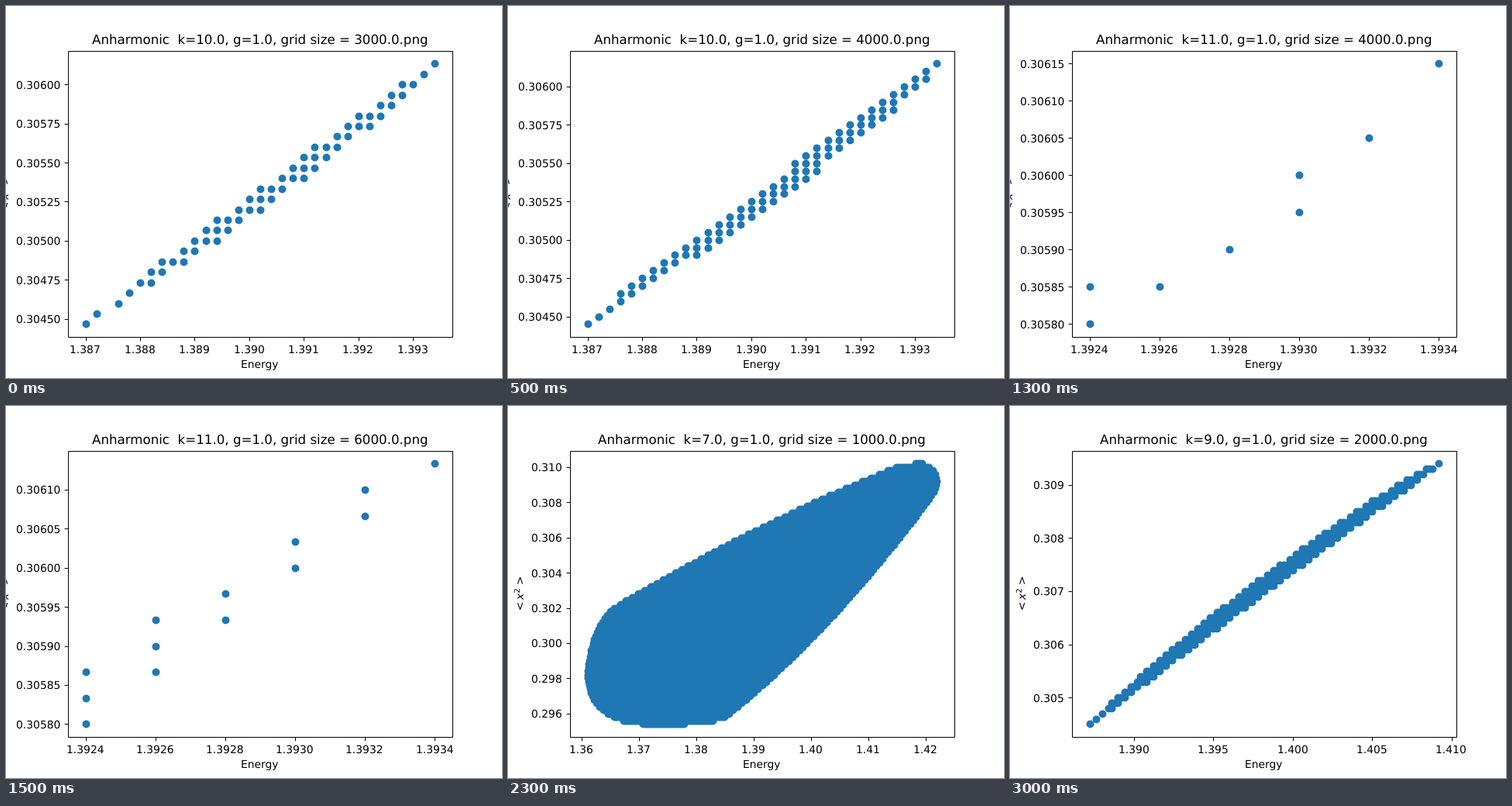
An HTML page for the animation above (3500 ms loop, 640 by 480 pixels).

```html
<!DOCTYPE html>
<html lang="en">
<head>
<meta charset="utf-8">
<title>Anharmonic scatter plots</title>
<style>
  html, body { margin: 0; width: 100%; height: 100%; overflow: hidden; background: #fff; }
  svg { display: block; width: 640px; height: 480px; }
  text { font-family: "DejaVu Sans", sans-serif; fill: #000; white-space: pre; text-rendering: geometricPrecision; }
  .line { fill: none; stroke: #000; stroke-width: 1; }
  .dots { fill: none; stroke: #1f77b4; stroke-width: 10; stroke-linecap: round; }
</style>
</head>
<body>
<svg id="plot" viewBox="0 0 640 480"></svg>
<script>
const HOLD = 500;
const LEFT = 102.55, WIDE = 450.9, TOP = 74.4, BASE = 410.4;
const SMALL = 13.89, LARGE = 16.67;
const { ceil, floor, round, min } = Math;
const svg = document.getElementById('plot');
const pen = document.createElement('canvas').getContext('2d');

const snap = v => floor(v + 0.5) + 0.5;
const dash = (x0, x1, y) => `M${snap(x0)} ${snap(y)}h${round(x1) - round(x0)}`;
const rowY = (j, rows) => BASE - (BASE - TOP) * j / rows;
const colX = (i, cols) => LEFT + WIDE * i / cols;
const bump = u => 4 * u * (1 - u);

// Vertical runs of dots, lo to hi in each column
function columns(cols, rows, lo, hi) {
  let d = '';
  for (let i = 0; i <= cols; i++) {
    const x = colX(i, cols), end = hi(i, i / cols);
    for (let j = lo(i, i / cols); j <= end; j++) d += dash(x, x, rowY(j, rows));
  }
  return d;
}

// Horizontal runs of dots, lo to hi in each row
function beads(cols, rows, lo, hi) {
  let d = '';
  for (let j = 0; j <= rows; j++) {
    const end = hi(j, j / rows);
    for (let i = lo(j, j / rows); i <= end; i++) {
      const x = colX(i, cols);
      d += dash(x, x, rowY(j, rows));
    }
  }
  return d;
}

// x at height y on a downward chain of quadratic curves: point, control, point, ...
function edge(chain, y) {
  let k = 0;
  while (k + 4 < chain.length && chain[k + 2][1] < y) k += 2;
  const [p, c, q] = chain.slice(k, k + 3);
  const at = (t, n) => (1 - t) ** 2 * p[n] + 2 * t * (1 - t) * c[n] + t * t * q[n];
  let a = 0, b = 1;
  for (let n = 0; n < 20; n++) {
    const m = (a + b) / 2;
    if (at(m, 1) < y) a = m; else b = m;
  }
  return at(a, 0);
}

// Dots so dense that each row is one solid run between two edges
function strips(rows, left, right) {
  let d = '';
  for (let j = 0; j <= rows; j++) {
    const y = rowY(j, rows);
    d += dash(edge(left, y), edge(right, y), y);
  }
  return d;
}

// x, y: data range; xt, yt: first tick, last tick, step, decimals
const charts = [
  { k: 10, grid: 3000, x: [1.387, 1.3934], y: [4567 / 15000, 4592 / 15000],
    xt: [1.387, 1.393, 0.001, 3], yt: [0.3045, 0.306, 0.00025, 5],
    d: columns(32, 25,
      (i, u) => ceil(0.78125 * i - 1.3 * bump(u) - 0.7 * u),
      (i, u) => floor(0.78125 * i + 0.32 + 0.33 * bump(u))) },
  { k: 10, grid: 4000, x: [1.387, 1.3934], y: [0.30445, 0.30615],
    xt: [1.387, 1.393, 0.001, 3], yt: [0.3045, 0.306, 0.00025, 5],
    d: columns(32, 34,
      (i, u) => ceil(1.0625 * i - 5.04 * u ** 0.83 * (1 - u) ** 0.4),
      i => floor(1.0625 * i + 0.84)) },
  { k: 11, grid: 4000, x: [1.3924, 1.3934], y: [0.3058, 0.30615],
    xt: [1.3924, 1.3934, 0.0002, 4], yt: [0.3058, 0.30615, 0.00005, 5],
    d: columns(5, 7,
      i => i + floor(i / 4) + floor(i / 5),
      (i, u) => floor(1.4 * i + 1 - 0.5 * bump(u) - u)) },
  { k: 11, grid: 6000, x: [1.3924, 1.3934], y: [0.3058, 9184 / 30000],
    xt: [1.3924, 1.3934, 0.0002, 4], yt: [0.3058, 0.3061, 0.00005, 5],
    d: columns(5, 10, i => 2 * i, i => min(10, 2 * i + (i < 2 ? 2 : 1))) },
  { k: 7, grid: 1000, x: [1.361, 1.422], y: [0.2954, 0.3102],
    xt: [1.36, 1.42, 0.01, 2], yt: [0.296, 0.31, 0.002, 3],
    d: strips(74,
      [[526, TOP], [515, 74.5], [501, 79], [319, 152], [137, 260.5], [108, 285],
        [103, 345], [104, 404], [174, BASE]],
      [[534, TOP], [566, 87], [543, 120], [411, 297], [279, 401.3], [264, 408], [227, BASE]]) },
  { k: 8, grid: 1000, x: [1.3638, 1.4092], y: [0.301, 0.3094],
    xt: [1.37, 1.41, 0.01, 2], yt: [0.302, 0.308, 0.002, 3],
    d: strips(42,
      [[553, TOP], [370, 175], [115, 378], [101, 390], [103, BASE]],
      [[553, TOP], [250, 360], [138, BASE]]) },
  { k: 9, grid: 2000, x: [1.3872, 1.4092], y: [0.3045, 0.3094],
    xt: [1.39, 1.41, 0.005, 3], yt: [0.305, 0.309, 0.001, 3],
    d: beads(110, 49,
      (j, u) => ceil(1.675 * j + 0.0106 * j * j - 0.05 + 2.48 * u ** 60),
      (j, u) => floor(2.245 * j + 0.55 - 0.9 * bump(u))) }
];

function ticks([first, last, step]) {
  const n = round((last - first) / step);
  return Array.from({ length: n + 1 }, (_, i) => first + i * step);
}

function width(s, size) {
  pen.font = `${size}px "DejaVu Sans", sans-serif`;
  return pen.measureText(s).width;
}

const text = (x, y, s, size = SMALL, more = '') =>
  `<text x="${x}" y="${y}" font-size="${size}" ${more}>${s}</text>`;
const centred = (x, y, s, size = SMALL) => text(floor(x - width(s, size) / 2), y, s, size);
const labelLeft = s => floor(70.6 - width(s, SMALL));

function yLabel(left) {
  return `<g transform="translate(${left - 10} 267) rotate(-90)">` +
    text(2.7, 0, '&lt;') +
    text(17.1, 0, 'x', SMALL, 'font-style="oblique"') +
    text(25.6, -5.3, '2', SMALL * 0.7) +
    text(36, 0, '&gt;') + '</g>';
}

function draw(c) {
  let marks = '', labels = '', left = 0;
  for (const v of ticks(c.xt)) {
    const x = LEFT + WIDE * (v - c.x[0]) / (c.x[1] - c.x[0]);
    marks += `M${snap(x)} 427.5v4.9`;
    labels += centred(x, 448, v.toFixed(c.xt[3]));
  }
  for (const v of ticks(c.yt)) {
    const y = BASE - (BASE - TOP) * (v - c.y[0]) / (c.y[1] - c.y[0]);
    const s = v.toFixed(c.yt[3]);
    left = labelLeft(s);
    marks += `M80.5 ${snap(y)}h-4.9`;
    labels += text(left, round(y + 5.45), s);
  }
  const title = `Anharmonic  k=${c.k}.0, g=1.0, grid size = ${c.grid}.0.png`;
  svg.innerHTML = `<path class="dots" d="${c.d}"/>` +
    `<path class="line" d="M80.5 58.5h496v369h-496z${marks}"/>` +
    labels + centred(328, 49, title, LARGE) + centred(328, 467, 'Energy') + yLabel(left);
}

let shown = -1;
function tick() {
  const i = floor(performance.now() / HOLD) % charts.length;
  if (i !== shown) draw(charts[shown = i]);
  requestAnimationFrame(tick);
}
tick();
</script>
</body>
</html>
```
